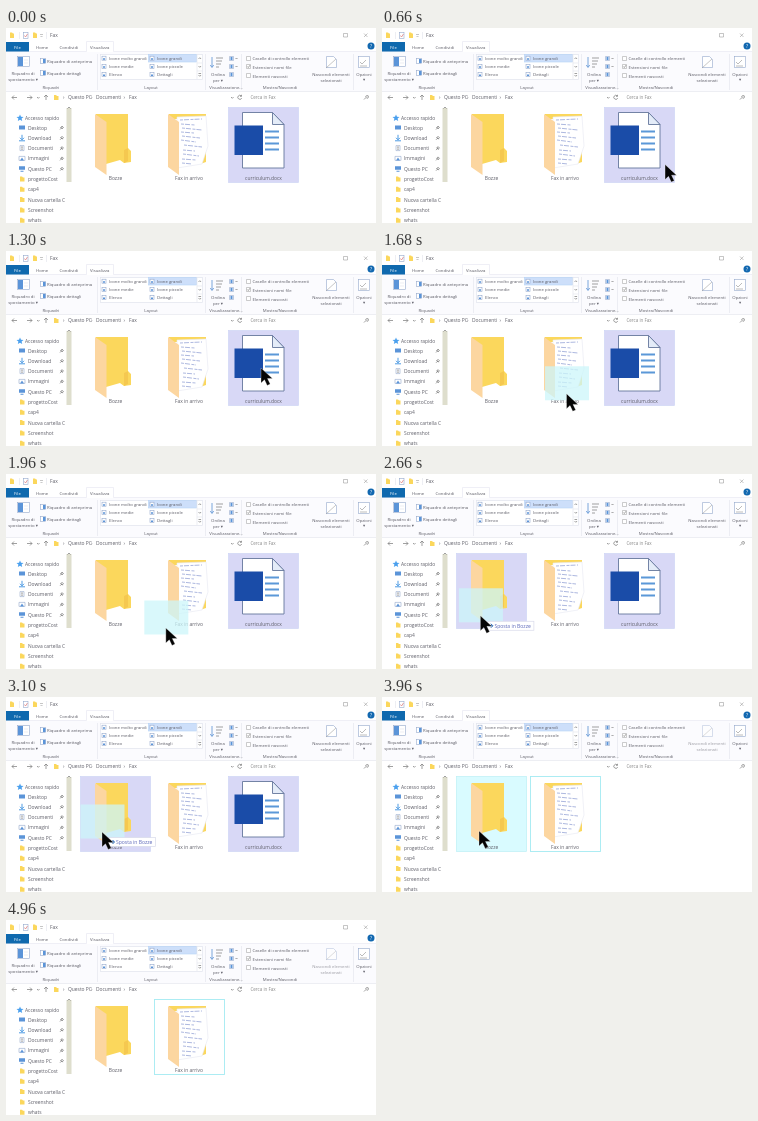
Animation of 370x195 px, one loop 5620 ms. Source, as an HTML page:

```html
<!DOCTYPE html>
<html lang="it">
<head>
<meta charset="utf-8">
<title>Trascina il file nella cartella</title>
<style>
  html, body { margin: 0; width: 100%; height: 100%; overflow: hidden; background: #fff }
  svg { display: block; width: 100vw; height: 100vh }
  text { font: 4.9px "Open Sans", "Noto Sans", sans-serif; fill: #5c5c66; dominant-baseline: central }
  .ribbon text { font-size: 4.3px }
  .mid text, text.mid { text-anchor: middle }
  .line { fill: none; stroke: #e6e7ee; stroke-width: .7 }
  .stroke { fill: none; stroke: #777; stroke-width: .7 }
  .blue { fill: #5b94d8 }
  .page { fill: #fff; stroke: #94a8cc; stroke-width: .6 }
  .selected { fill: #d8d8f6; stroke: #cfd6f6; stroke-width: .7 }
  .back { fill: #fbd75c }
  .flap { fill: #fcd6a0 }
</style>
</head>
<body>
<svg viewBox="0 0 370 195" preserveAspectRatio="none">
  <!-- Title bar and tabs -->
  <path class="back" d="M4 4.500h2l1 1h1V10H4zM27 4.500h2l1 1h1V10h-4z"/>
  <path class="line" d="M13.500 4v7M40.500 4v7"/>
  <rect class="page" x="17.500" y="4.500" width="4.500" height="6"/>
  <path d="M18.500 7.500l1 1.500 2-3" fill="none" stroke="#d77" stroke-width=".7"/>
  <path class="stroke" d="M34 6.500h3M34.500 8l1 1 1-1M337.500 5.500h4v3.500h-4zM358 5.500l3.500 3.500M361.500 5.500L358 9" opacity=".6"/>
  <text x="44" y="6.500">Fax</text>
  <circle cx="365" cy="18" r="3.500" fill="#1268b0"/>
  <text class="mid" x="365" y="18" style="fill:#fff">?</text>
  <rect y="24" width="370" height="39" fill="#fbfbfe"/>
  <path d="M0 23.500H80.500V13.500h27v10H370" fill="none" stroke="#e8e9f2" stroke-width=".7"/>
  <rect y="14" width="23" height="9.500" fill="#0f69ae"/>
  <g class="ribbon">
    <text x="8" y="18.500" style="fill:#fff">File</text>
    <text x="30" y="18.500">Home</text>
    <text x="53.500" y="18.500">Condividi</text>
    <text x="84" y="18.500">Visualizza</text>
  </g>

  <!-- Ribbon -->
  <g class="ribbon">
    <path class="line" d="M0 63.500H370M91.500 26v36M199.500 26v36M235.500 26v36M347.500 26v36"/>
    <rect class="page" x="11.500" y="28.500" width="12" height="10"/>
    <path class="blue" d="M12 29h5v9h-5z"/>
    <path class="line" d="M18 32h4M18 35h4"/>
    <rect class="page" x="34.500" y="30.500" width="5" height="5"/>
    <path class="blue" d="M37 31h2.500v4H37z"/>
    <rect class="page" x="34.500" y="42.500" width="5" height="5"/>
    <path class="blue" d="M37 43h2.500v4H37z"/>
    <text x="41" y="32.500">Riquadro di anteprima</text>
    <text x="41" y="45">Riquadro dettagli</text>

    <rect x="94.500" y="26.500" width="102" height="25" fill="#fff" stroke="#e2e4ee" stroke-width=".7"/>
    <rect x="142.500" y="26.500" width="48" height="7.500" fill="#cddffa" stroke="#b5d2f6" stroke-width=".6"/>
    <path class="line" d="M191 26v25M191 35h5M191 43h5"/>
    <path class="stroke" d="M192.500 31l1.300-1.300 1.300 1.300M192.500 38l1.300 1.300 1.300-1.300M192.500 47l1.300 1.300 1.300-1.300M192.500 45.500h2.600"/>
    <g id="layouts"></g>

    <path d="M206 29v10M204.300 37l1.700 2.500 1.700-2.500" fill="none" stroke="#6b9cd8" stroke-width=".9"/>
    <path class="stroke" d="M210 30h7M210 33h6M210 36h5M210 39h3"/>
    <path class="page" d="M223.500 28.500h4v4h-4zM223.500 36.500h4v4h-4zM223.500 44.500h4v4h-4z"/>
    <path class="blue" d="M224.500 29h2v3h-2zM224.500 37h2v3h-2zM224.500 45h2v3h-2z"/>
    <path class="stroke" d="M229.500 30l1 1 1-1M229.500 38l1 1 1-1"/>

    <path d="M240.500 28.500h4v4h-4zM240.500 36.500h4v4h-4zM240.500 45.500h4v4h-4z" fill="#fff" stroke="#999" stroke-width=".5"/>
    <path class="stroke" d="M241.300 38.500l1 1 1.700-2.300"/>
    <text x="246.500" y="30.200">Caselle di controllo elementi</text>
    <text x="246.500" y="38.500">Estensioni nomi file</text>
    <text x="246.500" y="47.800">Elementi nascosti</text>

    <g id="hide" class="mid">
      <path class="page" d="M320.500 28.500h7l3 3v8h-10z"/>
      <path class="stroke" d="M320 40l10-9" opacity=".6"/>
      <text x="325" y="45.500">Nascondi elementi</text>
      <text x="325" y="51.500">selezionati</text>
    </g>
    <rect class="page" x="352.500" y="28.500" width="11" height="11"/>
    <path class="stroke" d="M354 34l2 2 4-4M354 38h7" opacity=".7"/>

    <g class="mid">
      <text x="17" y="45">Riquadro di</text>
      <text x="17" y="51">spostamento ▾</text>
      <text x="212" y="46">Ordina</text>
      <text x="212" y="51.500">per ▾</text>
      <text x="358" y="45.500">Opzioni</text>
      <text x="358" y="51">▾</text>
      <text x="45" y="58.500">Riquadri</text>
      <text x="145" y="58.500">Layout</text>
      <text x="220" y="58.500">Visualizzazione...</text>
      <text x="274" y="58.500">Mostra/Nascondi</text>
    </g>
  </g>

  <!-- Address bar -->
  <path class="stroke" d="M6 69.500h5M8 67.500l-2 2 2 2M21 69.500h5M24 67.500l2 2-2 2M31 69l1.300 1.300L33.600 69M40 72V67M38 69l2-2 2 2M225 69l1.300 1.300 1.300-1.300M235.300 68a2 2 0 1 0 .4 2M235.500 66.800V68.300h-1.500M358 71.500l2-2a1.300 1.300 0 1 1 .5.500"/>
  <path class="back" d="M48 67h2l1 1h1.500v4H48z"/>
  <text x="57" y="69.200">›</text>
  <text x="62" y="69.200">Questo PC</text>
  <text x="85" y="69.200">›</text>
  <text x="90" y="69.200">Documenti</text>
  <text x="117.500" y="69.200">›</text>
  <text x="123" y="69.200">Fax</text>
  <text x="244.500" y="69.200" style="fill:#888;font-size:4.500px">Cerca in Fax</text>

  <!-- Navigation pane -->
  <path d="M14 86.500l1 2.200 2.500.2-1.900 1.700.6 2.500-2.200-1.300-2.200 1.300.6-2.500-1.900-1.700 2.500-.2z" fill="#4ba0ee"/>
  <text x="19" y="89.500">Accesso rapido</text>
  <g id="places"></g>
  <rect x="60.500" y="80" width="5" height="74" fill="#dedecd"/>
  <path class="stroke" d="M61.500 80.500l1.500-1.500 1.500 1.500"/>

  <!-- Folder contents -->
  <rect id="drop" class="selected" x="74.500" y="79.500" width="70" height="75"/>
  <rect id="hover" x="74.500" y="79.500" width="70" height="75" fill="#d9fbff" stroke="#bdf0f6" stroke-width=".7"/>
  <rect id="focus" x="148.500" y="79.500" width="70" height="75" fill="none" stroke="#a4ebf2" stroke-width=".9"/>
  <path class="back" d="M90 86h32v34l3 3v11l-7 1-4-3-14 4H90z"/>
  <path d="M118 122l4-2v13l-4 2z" fill="#f5c850"/>
  <path class="flap" d="M89 86l11.500 8v53L89 139z"/>
  <text class="mid" x="109.500" y="149.800">Bozze</text>

  <path class="back" d="M163 86h37v5h-37zM195 121l5-1v14l-6 2z"/>
  <path class="page" d="M171 89l29-1 2 30-6 18-25 4z" style="stroke:#e6e8f2"/>
  <path d="M174 92l22-1M175 96l14 1M176 100l20 2M175 104l13 1M176 108l18 2M175 112l15 2M178 117l18 2M177 122l12 1M177 126l16 2M176 131l14 1M176 135l10 1" stroke="#a4b0dc" stroke-dasharray="3 1 5 1.500" fill="none" stroke-width=".9"/>
  <path class="flap" d="M162 86l11 8v53l-11-8z"/>
  <text class="mid" x="183" y="149.800">Fax in arrivo</text>

  <g id="file">
    <rect class="selected" x="222.500" y="79.500" width="70" height="75"/>
    <path d="M236.500 84.500h30l11.500 12v43.500h-41.500z" fill="#fff" stroke="#66789c" stroke-width=".9"/>
    <path d="M266.500 84.500v12h11.500z" fill="#e4ecf8" stroke="#66789c" stroke-width=".9"/>
    <path d="M259 103.500h14M259 109.500h14M259 115.500h14M259 121.500h14" stroke="#5b98d8" stroke-width="2"/>
    <rect x="228.500" y="97.500" width="28.500" height="29.500" fill="#1a4ca8"/>
    <text class="mid" x="257.500" y="149.800">curriculum.docx</text>
  </g>

  <!-- Drag image and pointer -->
  <g id="pointer">
    <rect id="ghost" x="-21.500" y="-27.500" width="44" height="34" fill="#cdf6fa" opacity=".75"/>
    <g id="tip">
      <rect x="6.500" y="5.500" width="47" height="9" fill="#fff" stroke="#d8daea" stroke-width=".7"/>
      <path d="M8 10h4M10.500 8l2 2-2 2" fill="none" stroke="#2466b8"/>
      <text x="14" y="10" style="fill:#5a66b8;font-size:5px">Sposta in Bozze</text>
    </g>
    <path d="M0 0v15l3.500-3.200 2.700 5.700 3-1.400-2.700-5.500h5z" fill="#050505" stroke="#fff" stroke-width=".3"/>
  </g>
</svg>
<script>
const LOOP = 5620, GRAB = 1320, DROP = 3500;
const $ = id => document.getElementById(id);

$('layouts').innerHTML = ['Icone molto grandi', 'Icone grandi', 'Icone medie', 'Icone piccole', 'Elenco', 'Dettagli']
  .map((name, i) => {
    const x = 96 + i % 2 * 48, y = 30.2 + (i >> 1) * 8.1;
    return `<rect class="page" x="${x}" y="${y - 2}" width="4" height="4"/>
      <path class="blue" d="M${x + 1} ${y}h2v1.500h-2z"/><text x="${x + 7}" y="${y}">${name}</text>`;
  }).join('');

const icons = [
  '<path class="blue" d="M0-2h6v4H0z"/>',
  '<path d="M3-3v5M1 0l2 2 2-2M0 3h6" fill="none" stroke="#3a90e0" stroke-width=".9"/>',
  '<path class="page" d="M1-2.500h4v5H1z"/><path class="stroke" d="M2-1h2M2 1h2"/>',
  '<path class="page" d="M0-2h6v4H0z"/><path class="blue" d="M1 2l2-3 2 3z"/>',
  '<path class="blue" d="M0-2.500h6v3.500H0zM1.500 2h3v1h-3z"/>'
];
const folderIcon = '<path class="back" d="M1-2.500h2l1 1h1.500v4H1z"/>';
const pin = '<path class="stroke" d="M41 2l1.500-1.500M41.500-.5l2 2M43-1.500l1.500 1.500-1.500 1-1-1z"/>';

$('places').innerHTML = ['Desktop', 'Download', 'Documenti', 'Immagini', 'Questo PC', 'progettoCost', 'cap4', 'Nuova cartella C', 'Screenshot', 'whats']
  .map((name, i) => `<g transform="translate(13 ${99.5 + i * 10.3})">
    ${icons[i] ? icons[i] + pin : folderIcon}<text x="9" y="0">${name}</text></g>`).join('');

// Pointer path: time, x, y
const path = [
  [0, 374, 168], [580, 288, 140], [1120, 255, 117], [GRAB, 255, 117], [1740, 173, 147],
  [1960, 160, 154], [2300, 102, 152], [2900, 96, 135], [DROP, 96, 135], [3700, 97, 134],
  [4500, 97, 134], [4960, 374, 180], [LOOP, 374, 180]
];

function pointerAt(t) {
  const i = path.findIndex(p => p[0] > t), [t0, x0, y0] = path[i - 1], [t1, x1, y1] = path[i];
  const k = (t - t0) / (t1 - t0);
  return [x0 + (x1 - x0) * k, y0 + (y1 - y0) * k];
}

const show = (id, on) => $(id).style.display = on ? '' : 'none';

function draw(now) {
  const t = now % LOOP, [x, y] = pointerAt(t);
  const dragging = t > GRAB && t < DROP, inFolder = x < 145, dropped = t >= DROP;
  $('pointer').setAttribute('transform', `translate(${x} ${y})`);
  show('ghost', dragging);
  show('tip', dragging && inFolder);
  show('drop', dragging && inFolder);
  show('hover', dropped && inFolder);
  show('focus', dropped);
  show('file', !dropped);
  $('hide').style.opacity = dropped ? .6 : 1;
  requestAnimationFrame(draw);
}
requestAnimationFrame(draw);
</script>
</body>
</html>
```
